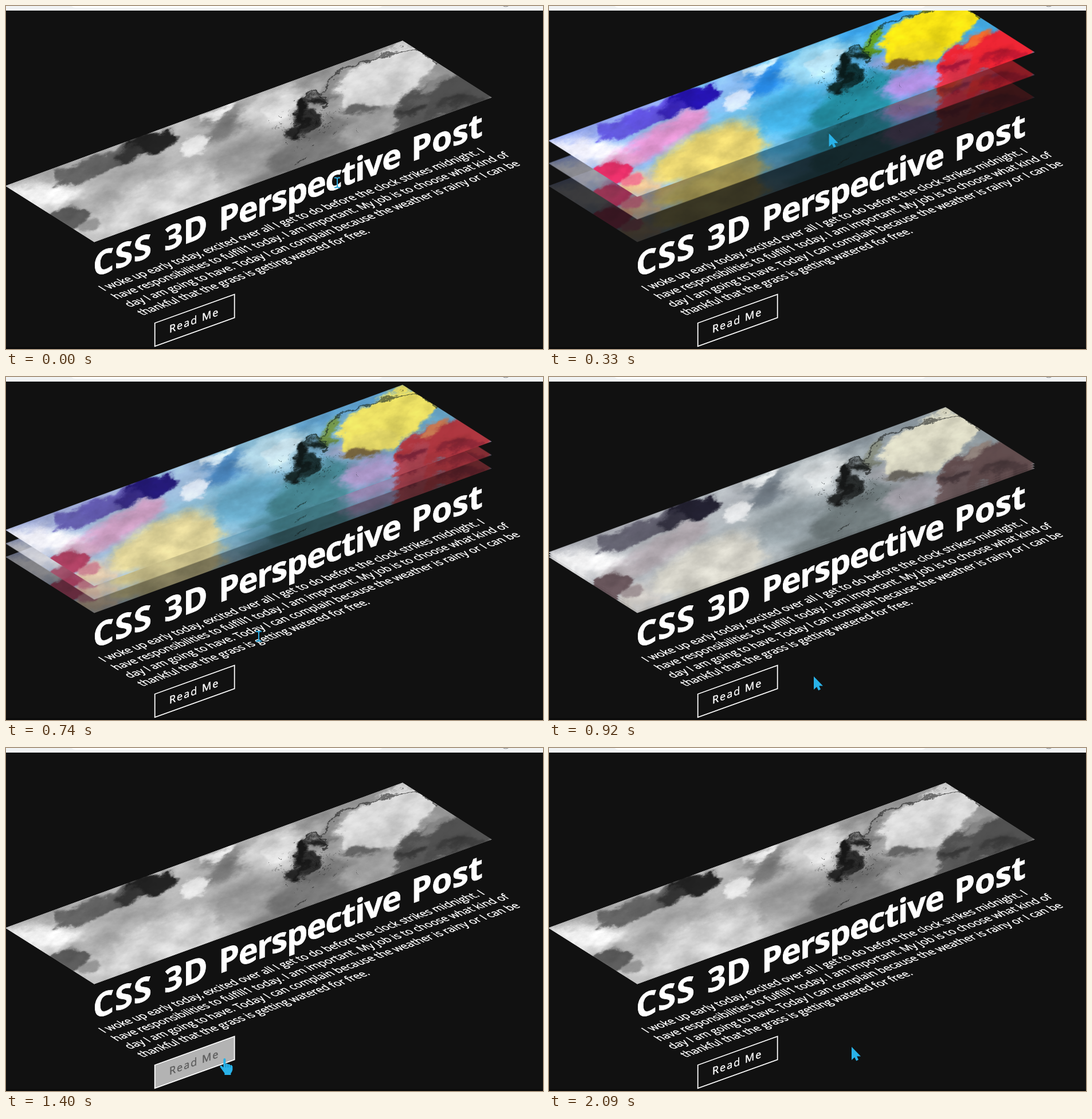
Recreate the animation shown at these times as an HTML page with a canvas. Size 937 by 598 pixels, loop 2140 ms.

```html
<!DOCTYPE html>
<html lang="en">
<head>
<meta charset="utf-8">
<title>CSS 3D Perspective Post</title>
<style>
  html, body { margin: 0; width: 100%; height: 100%; overflow: hidden; background: #111; }
  #stage { position: absolute; inset: 0; width: 937px; height: 598px; overflow: hidden; background: #111; }
  #card, #card canvas { position: absolute; left: 0; top: 0; }
  svg { position: absolute; left: 0; top: 0; }
  text { font-family: "Open Sans", "Noto Sans", sans-serif; color: #fff; fill: currentColor; stroke: currentColor; white-space: pre; }
  .title { font-size: 57.4px; font-weight: 700; stroke-width: .8px; }
  .post { font-size: 17.3px; stroke-width: .45px; }
  .label { font-size: 18px; letter-spacing: 2px; stroke-width: .45px; }
</style>
</head>
<body>
<div id="stage">
  <div id="card"></div>
  <svg width="937" height="598" viewBox="0 0 937 598">
    <rect y="595" width="937" height="3" fill="#0a0a0a"/>
    <rect width="937" height="8" fill="#f1f3f4"/>
    <rect x="112" y="-20" width="547" height="23" rx="9" fill="#fff"/>
    <circle cx="872" cy="-7" r="8" fill="#f8f8f8" stroke="#8b8d90" stroke-width="1.2"/>

    <g class="title" transform="matrix(1 -.364 0 1 152 473.5)">
      <text letter-spacing="1.2">CSS</text>
      <text x="124" letter-spacing=".6">3D</text>
      <text x="219" letter-spacing="-1.4">Perspective</text>
      <text x="555">Post</text>
    </g>

    <g class="post" transform="matrix(1 -.364 1 .636 171.5 497)">
      <text>I woke up early today, excited over all I get to do before the clock strikes midnight. I</text>
      <text y="22.3">have responsibilities to fulfill1 today. I am important. My job is to choose what kind of</text>
      <text y="44.6">day I am going to have. Today I can complain because the weather is rainy or I can be</text>
      <text y="66.9">thankful that the grass is getting watered for free.</text>
    </g>

    <g transform="matrix(1 -.36 0 1 259 552.3)">
      <rect id="button" x=".7" y=".7" width="139" height="40.6" stroke="#fff" stroke-width="1.8"/>
      <text id="label" class="label" x="26" y="27">Read Me</text>
    </g>

    <g id="cursor">
      <path id="arrow" d="M0 0V23L5.2 18.2 8.2 24.4 12 22.6 9.2 16.6H16Z" fill="#29b2e8"/>
      <path id="beam" d="M-5 -8.5H-1.5L0 -7 1.5 -8.5H5M0 -7V7M-5 8.5H-1.5L0 7 1.5 8.5H5"
            fill="none" stroke="#29a9e0" stroke-width="2"/>
      <g id="hand">
        <path d="M-2 2Q-2 0 0 0T2 2V10L4 9 6 10.5 8 10 10 12 12 11.5 14 14V20Q13 24 11 26V29H0V26L-5 19-8 15Q-8 12-5 13L-2 16Z" fill="#29b2e8"/>
        <path d="M2 10V16M6 11V16M10 12V16" stroke="#1583b4" fill="none"/>
      </g>
    </g>
  </svg>
</div>
<script>
const $ = id => document.getElementById(id);
const LOOP = 2140, TOP = 60, WIDTH = 848, HEIGHT = 352, LIFT = 87;

// ---------- painting ----------
let seed = 7;
const rnd = () => (seed = seed * 16807 % 2147483647) / 2147483647;

// x, y, rx, ry, degrees, colour
const washes = [
  [95, 282, 120, 28, -20, '#8fa6f4'],
  [75, 333, 78, 22, 6, '#eeeefa'],
  [200, 306, 92, 22, -30, '#ef98dc'],
  [130, 348, 34, 12, -10, '#f2a6d8'],
  [285, 337, 104, 40, -20, '#ecd668'],
  [160, 390, 42, 17, -10, '#f2c68c'],
  [330, 222, 66, 30, -25, '#86bdf8'],
  [385, 208, 46, 26, -38, '#1f8cf2'],
  [465, 175, 64, 34, -20, '#98dcfa'],
  [430, 262, 66, 34, -20, '#3ab2ea'],
  [470, 300, 60, 22, -20, '#2a9cc0'],
  [530, 248, 84, 38, -22, '#1a8ca2'],
  [600, 102, 104, 13, -20, '#2a9ef0'],
  [590, 180, 34, 18, 0, '#8aa4e0'],
  [635, 212, 52, 20, -18, '#b08ce4']
];
const stains = [
  [185, 264, 108, 13, -24, '#5f50e8'],
  [115, 295, 40, 9, -4, '#6258e8'],
  [250, 240, 44, 20, -22, '#2411b8'],
  [210, 262, 30, 11, -15, '#3a24c8'],
  [330, 246, 30, 15, -12, '#cfe2fc'],
  [366, 184, 24, 7, -32, '#c4e6fc'],
  [478, 178, 40, 14, -24, '#b8e8fc'],
  [112, 366, 40, 15, -4, '#fa2c6c'],
  [148, 381, 26, 8, 8, '#f87890'],
  [665, 125, 97, 41, -28, '#f6e000'],
  [640, 160, 48, 24, -15, '#eed80c'],
  [565, 146, 9, 24, 30, '#5c9c14'],
  [762, 161, 97, 34, -20, '#fc2030'],
  [712, 190, 42, 22, -36, '#f23048'],
  [745, 136, 30, 7, -32, '#fc6a24'],
  [712, 184, 36, 7, -16, '#b8143a'],
  [790, 168, 34, 7, -14, '#cc1430'],
  [616, 187, 32, 9, -8, '#86641c'],
  [514, 198, 11, 34, 14, '#0a1c1c'],
  [530, 205, 12, 22, 24, '#0d3438'],
  [543, 166, 20, 6, -15, '#0c2624'],
  [502, 214, 10, 9, 0, '#0c2c2c']
];

function blob(ctx, [x, y, rx, ry, deg, colour]) {
  ctx.beginPath();
  ctx.ellipse(x, y, rx, ry, deg * Math.PI / 180, 0, 7);
  ctx.fillStyle = colour;
  ctx.fill();
}

function inkLine(ctx, path, width, alpha) {
  ctx.lineWidth = width;
  ctx.strokeStyle = `rgba(12,40,36,${alpha})`;
  ctx.stroke(new Path2D(path));
}

function newCanvas() {
  const canvas = document.createElement('canvas');
  canvas.width = WIDTH;
  canvas.height = HEIGHT;
  return canvas;
}

// Smooth lattice noise, summed over octaves, about -1 to 1
const lattice = Array.from({ length: 4096 }, rnd);
function noise(x, y) {
  const ix = Math.floor(x), iy = Math.floor(y);
  let u = x - ix, v = y - iy;
  u *= u * (3 - 2 * u);
  v *= v * (3 - 2 * v);
  const at = (i, j) => lattice[(ix + i & 63) + (iy + j & 63) * 64];
  const top = at(0, 0) + (at(1, 0) - at(0, 0)) * u;
  const low = at(0, 1) + (at(1, 1) - at(0, 1)) * u;
  return 2 * (top + (low - top) * v) - 1;
}
function fractal(x, y) {
  let sum = 0;
  for (let f = 1; f < 32; f *= 2) sum += noise(x * f, y * f) / f ** .8;
  return sum * .6;
}

function drawShapes(ctx) {
  ctx.translate(0, -TOP);
  const sky = ctx.createLinearGradient(0, 313, 692, 160);
  sky.addColorStop(0, '#a4b8f6');
  sky.addColorStop(.5, '#6cc6f4');
  sky.addColorStop(1, '#3aaae8');
  ctx.fillStyle = sky;
  ctx.fillRect(0, TOP, WIDTH, HEIGHT);
  ctx.filter = 'blur(7px)';
  washes.forEach(row => blob(ctx, row));
  ctx.filter = 'blur(2px)';
  stains.forEach(row => blob(ctx, row));
  ctx.filter = 'blur(.7px)';
  inkLine(ctx, 'M556 156Q566 124 600 108T660 86Q690 74 716 78Q736 88 752 100', 3, .6);
  inkLine(ctx, 'M526 168Q534 154 552 156Q566 166 556 176', 3, .7);
  inkLine(ctx, 'M500 286Q508 276 526 274M504 279L527 268', 2, .6);
  ctx.filter = 'none';
  for (let i = 0; i < 260; i++) {
    const a = rnd() * 6.28, d = rnd() * rnd();
    ctx.fillStyle = `rgba(10,35,35,${.25 + rnd() * .45})`;
    ctx.fillRect(530 + Math.cos(a) * d * 90, 205 + Math.sin(a) * d * 55, 1.6, 1.4);
  }
}

// Lets the edges run like wet paint and varies the density of the pigment.
function bleed(ctx) {
  const from = ctx.getImageData(0, 0, WIDTH, HEIGHT), to = ctx.createImageData(WIDTH, HEIGHT);
  const clamp = (v, max) => Math.min(max, Math.max(0, Math.round(v)));
  for (let y = 0; y < HEIGHT; y++) for (let x = 0; x < WIDTH; x++) {
    // noise runs along the slope of the card
    const p = (x - y * .5) / 46, q = (y + x * .37) / 26;
    const sx = clamp(x + 20 * fractal(p, q), WIDTH - 1);
    const sy = clamp(y + 13 * fractal(p + 19, q + 7), HEIGHT - 1);
    const tone = 1 + .13 * fractal(p + 31, q + 43);
    const i = 4 * (y * WIDTH + x), j = 4 * (sy * WIDTH + sx);
    for (let c = 0; c < 3; c++) to.data[i + c] = from.data[j + c] * tone;
    to.data[i + 3] = 255;
  }
  ctx.putImageData(to, 0, 0);
}

function newLayer(art) {
  const layer = newCanvas(), ctx = layer.getContext('2d');
  layer.style.top = TOP + 'px';
  ctx.translate(0, -TOP);
  ctx.clip(new Path2D('M-1 313.5L692 60.5 847.5 159.5 154 411.5Z'));
  ctx.drawImage(art, 0, TOP);
  $('card').append(layer);
  return layer;
}

const art = newCanvas();
drawShapes(art.getContext('2d'));
bleed(art.getContext('2d'));
const layers = [0, 1, 2].map(() => newLayer(art));

// ---------- motion ----------
// Cubic curve (.25, .1, .25, 1)
function ease(x) {
  if (x <= 0) return 0;
  if (x >= 1) return 1;
  let lo = 0, hi = 1, s = .5;
  for (let i = 0; i < 22; i++) {
    s = (lo + hi) / 2;
    if (.75 * s * (1 - s) + s ** 3 < x) lo = s; else hi = s;
  }
  return .3 * s * (1 - s) ** 2 + 3 * s * s * (1 - s) + s ** 3;
}
const hover = (t, enter, leave) => ease((t - enter) / 500) - ease((t - leave) / 500);

// time, x, y, shape
const moves = [
  [0, 578, 308, 'beam'], [50, 535, 262, 'arrow'], [100, 502, 233, 'arrow'], [150, 489, 221, 'arrow'],
  [560, 488, 224, 'arrow'], [610, 474, 345, 'beam'], [660, 456, 412, 'beam'], [740, 441, 452, 'beam'],
  [790, 446, 493, 'arrow'], [840, 456, 514, 'arrow'], [920, 462, 522, 'arrow'], [1070, 460, 523, 'arrow'],
  [1120, 448, 526, 'arrow'], [1150, 425, 532, 'arrow'], [1200, 392, 539, 'hand'], [1300, 381, 541, 'hand'],
  [1580, 382, 541, 'hand'], [1630, 408, 535, 'arrow'], [1680, 468, 528, 'arrow'], [1760, 516, 522, 'arrow'],
  [1860, 528, 521, 'arrow'], [LOOP, 528, 521, 'arrow']
];

function placeCursor(t) {
  const i = moves.findIndex(row => row[0] > t);
  const [t0, x0, y0, shape] = moves[i - 1], [t1, x1, y1] = moves[i];
  const k = (t - t0) / (t1 - t0);
  $('cursor').setAttribute('transform', `translate(${x0 + (x1 - x0) * k} ${y0 + (y1 - y0) * k})`);
  for (const id of ['arrow', 'beam', 'hand']) $(id).style.display = id === shape ? '' : 'none';
}

const grey = v => `rgb(${v},${v},${v})`;

function pose(t) {
  const rise = hover(t, 13, 603), glow = hover(t, 1200, 1615);
  $('card').style.filter = `grayscale(${1 - rise})`;
  layers.forEach((layer, i) => {
    layer.style.transform = `translateY(${-LIFT * rise * i / 2}px)`;
    layer.style.opacity = 1 - rise * [.9, .5, 0][i];
  });
  $('button').style.fill = grey(17 + 238 * glow);
  $('label').style.color = grey(255 - 238 * glow);
  placeCursor(t);
}

// The picture is held between beats of 50 ms, a few of 30 ms.
const shortBeats = [150, 430, 710, 840, 1120, 1400, 1680, 1960];
const beats = [];
for (let t = 0; t < LOOP; t += shortBeats.includes(t) ? 30 : 50) beats.push(t);

const start = performance.now();
let shown = -1;
function tick() {
  const now = Math.max(0, performance.now() - start) % LOOP;
  const beat = beats.filter(t => t <= now).pop();
  if (beat !== shown) pose(shown = beat);
  requestAnimationFrame(tick);
}
tick();
</script>
</body>
</html>
```
